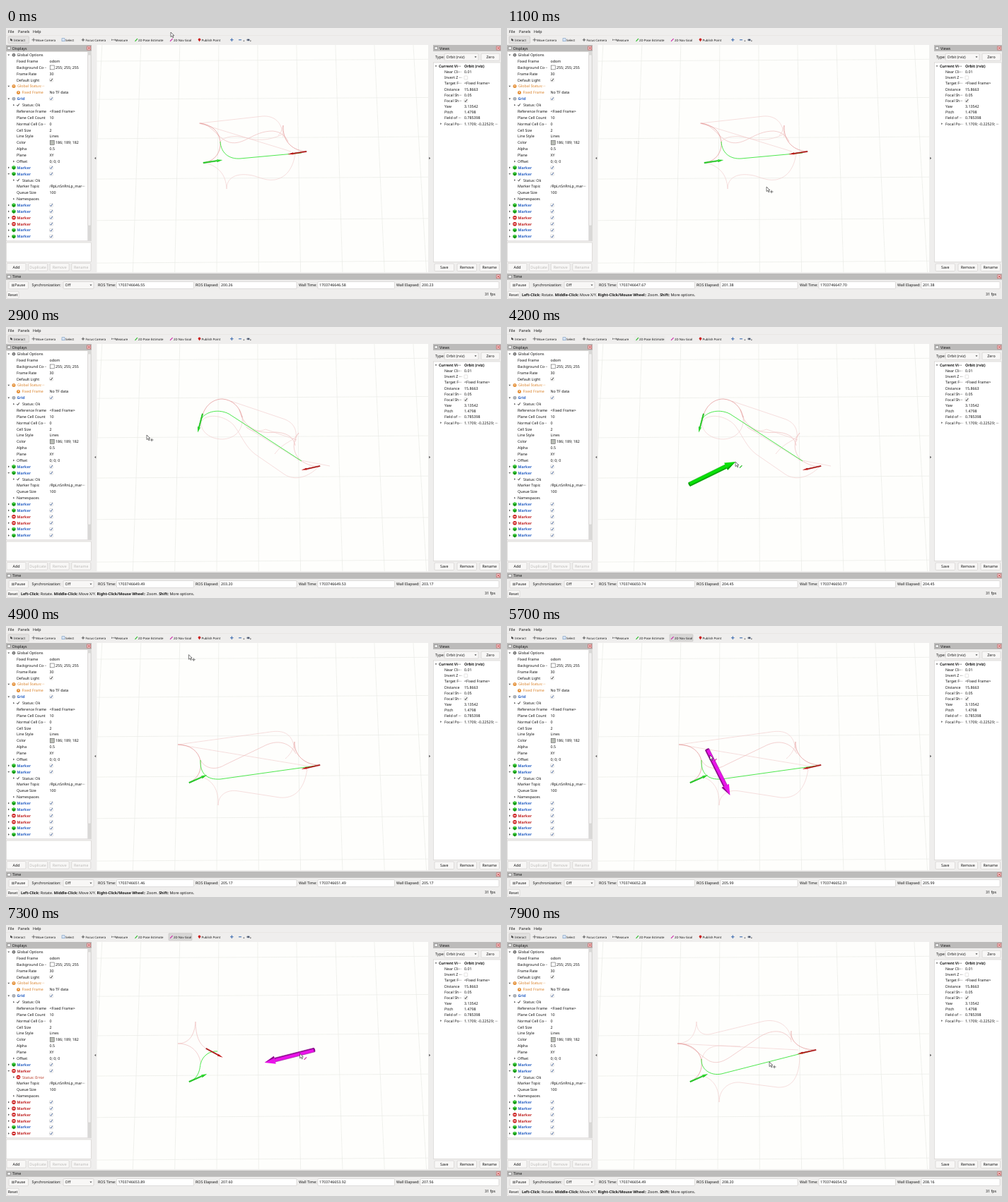
Write an HTML page that moves like this. It is 700 by 384 pixels and loops after 8000 ms.

```html
<!DOCTYPE html>
<html lang="en">
<head>
<meta charset="utf-8">
<title>Path planner in a 3D viewer</title>
<style>
html, body { margin: 0; width: 100%; height: 100%; overflow: hidden; background: #efeeed; }
svg { display: block; width: 700px; height: 384px; }
text { font: 5.3px "Noto Sans", "Open Sans", sans-serif; fill: #111; white-space: pre; text-rendering: geometricPrecision; }
.b { font-weight: 700; }
.tool { font-size: 4.35px; }
.blue { fill: #2a62c4; font-weight: 700; }
.bad { fill: #c02222; font-weight: 700; }
.warn { fill: #d9822b; }
.err { fill: #b5301c; }
.off { fill: #bbb9b7; }
.mid { text-anchor: middle; }
</style>
</head>
<body>
<svg id="stage" viewBox="0 0 700 384"></svg>
<script>
const text = (x, y, s, cls = '', id = '') =>
  `<text x="${x}" y="${y + 1.9}" class="${cls}" id="${id}">${s.replace(/</g, '&lt;')}</text>`;
const rect = (x, y, w, h, fill, stroke = 'none', r = 0) =>
  `<rect x="${x}" y="${y}" width="${w}" height="${h}" rx="${r}" fill="${fill}" stroke="${stroke}" stroke-width=".5"/>`;
const line = (d, color, w = .6) => `<path d="${d}" fill="none" stroke="${color}" stroke-width="${w}"/>`;
const shape = (d, fill) => `<path d="${d}" fill="${fill}"/>`;
const dot = (x, y, r, fill) => `<circle cx="${x}" cy="${y}" r="${r}" fill="${fill}"/>`;
const group = (id, body, extra = '') => `<g id="${id}" ${extra}>${body}</g>`;
const tick = (x, y, color = '#222') => line(`M${x - 1.6} ${y}l1.2 1.5l2.1 -3.3`, color, .9);
const checkbox = (x, y, on = true, color) =>
  rect(x - 2.4, y - 2.4, 4.8, 4.8, '#fff', '#c9c7c5', .6) + (on ? tick(x, y, color) : '');
const button = (x, y, w, h, label, cls = '') =>
  rect(x, y, w, h, '#f8f7f6', '#c6c3c0', 1.2) + text(x + w / 2, y + h / 2, label, 'mid ' + cls);
const field = (x, y, w, h) => rect(x, y, w, h, '#fff', '#c2bfbc', 1);
const combo = (x, y, w, label) =>
  rect(x, y, w, 10, '#f8f7f6', '#c2bfbc', 1.2) + text(x + 2.5, y + 5, label) +
  shape(`M${x + w - 5.5} ${y + 4}h3l-1.5 2z`, '#555');
const expander = (x, y, open) =>
  shape(open ? `M${x - 1.4} ${y - .8}h2.8l-1.4 1.9z` : `M${x - .8} ${y - 1.4}v2.8l1.9 -1.4z`, '#555');
const stop = (x, y) => dot(x, y, 2.8, '#cc2020') + rect(x - 1.6, y - .55, 3.2, 1.1, '#fff');
const cube = (x, y) =>
  shape(`M${x} ${y - 2.8}l2.6 1.3v2.8l-2.6 1.5l-2.6 -1.5v-2.8z`, '#16a316') +
  shape(`M${x} ${y - 2.8}l2.6 1.3l-2.6 1.3l-2.6 -1.3z`, '#4fd34f') + line(`M${x} ${y - .2}v2.9`, '#0a6b0a', .5);
const header = (x, y, w, label) =>
  rect(x, y, w, 9, '#bcbbba') + rect(x + 2, y + 2.6, 4.2, 3.8, '#f0f0f0', '#666') +
  text(x + 9, y + 4.7, label) + rect(x + w - 6.2, y + 2, 5, 5, '#f3dcdc', '#c23a3a') +
  line(`M${x + w - 5} ${y + 3.2}l2.6 2.6m0 -2.6l-2.6 2.6`, '#c02020', .9);

function arrow([x1, y1], [x2, y2], len, w, headLen, headW, fill, dark) {
  const angle = Math.atan2(y2 - y1, x2 - x1) * 180 / Math.PI, s = len - headLen;
  return `<g transform="translate(${x1} ${y1}) rotate(${angle})">` +
    rect(0, -w / 2, s, w, fill, dark) + rect(0, w * .25, s, w * .25, dark) +
    shape(`M${s} ${-headW / 2}L${len} 0L${s} ${headW / 2}z`, fill) +
    shape(`M${s} ${headW / 2}L${len} 0L${s} ${headW * .25}z`, dark) +
    (w > 3 ? `<ellipse cx="0" cy="0" rx="1.2" ry="${w / 2}" fill="${dark}"/>` : '') + '</g>';
}

// Ground plane as seen by the orbit camera.
function project(x, y) {
  const u = x - .96, v = -(y + .225);
  const up = u + .006 * v, right = v - .006 * u, k = 388.7 / (13.6 + up * .0907);
  return `${(363 + k * right).toFixed(1)} ${(185 - k * up).toFixed(1)}`;
}
function grid() {
  let d = '';
  for (let i = -10; i <= 10; i += 2)
    d += `M${project(i, -10)}L${project(i, 10)}M${project(-10, i)}L${project(10, i)}`;
  return line(d, '#e6e7e2', .6);
}

const PINK = '#f1cccc', ROSE = '#ecb6b6', RED = '#df8585', GREEN = '#45e645';
const pathsA = [
  [PINK, 'M273 135L363 125C379 124 391 133 392 155M392 138C389 147 388 150 385 152'],
  [PINK, 'M273 135L403 175M312 228C311 207 300 196 282 191'],
  [PINK, 'M312 228C312 213 324 206 342 208C356 209 364 217 380 215C397 212 406 198 409 178'],
  [ROSE, 'M275 135C292 137 299 157 316 162C337 167 349 146 377 146C389 147 395 153 399 161'],
  [PINK, 'M303 161C309 153 326 152 337 155C353 160 372 160 390 151'],
  [RED, 'M280 191C296 188 304 176 303 161C301 146 291 137 274 135'],
  [RED, 'M392 138C391 158 402 173 424 175'],
  [GREEN, 'M303 161C304 177 315 186 331 185L418 177']];
const scenes = [
  { at: 0, start: [[279, 191], [306, 187]], goal: [[425, 175], [399, 179]], paths: pathsA },
  { at: 1200, start: [[279, 191], [306, 187]], goal: [[443, 197], [417, 203]], paths: pathsA,
    warp: 'matrix(1.132 .153 0 1 -37 -42.8)' },
  { at: 2500, start: [[278, 123], [271, 150]], goal: [[444, 197], [417, 203]], paths: [
    [PINK, 'M277 128C271 145 286 159 306 159C325 158 336 145 334 126'],
    [PINK, 'M318 105L392 130C407 135 413 146 409 163M277 133C285 122 309 125 322 139'],
    [PINK, 'M322 139C334 155 338 169 352 180L394 209C408 218 427 214 443 197'],
    [PINK, 'M334 128C337 147 352 151 367 145L411 160M414 150C405 164 393 162 380 180'],
    [ROSE, 'M330 117C337 148 363 151 381 149C400 150 407 158 409 168'],
    [PINK, 'M412 188L458 197M340 142L414 188'],
    [RED, 'M277 128C281 111 293 102 306 102C320 103 331 113 334 128'],
    [ROSE, 'M414 150C403 163 406 181 418 190C426 195 434 198 443 197'],
    [GREEN, 'M276 130C284 119 301 116 315 123L418 190']] },
  { at: 4500, start: [[259, 222], [284, 211]], goal: [[444, 197], [417, 203]], paths: [
    [PINK, 'M243 168L374 150C393 147 407 153 408 178M408 164C407 176 400 184 395 188'],
    [PINK, 'M243 168L430 199M300 254C301 233 293 218 274 213'],
    [PINK, 'M300 254C300 239 313 231 329 234L387 243C408 245 422 232 426 202'],
    [ROSE, 'M275 190C281 202 296 205 309 197L363 171C385 159 402 166 410 181'],
    [RED, 'M259 222C272 216 277 204 275 191C272 177 260 168 243 168'],
    [RED, 'M408 164C407 183 423 197 443 197'],
    [GREEN, 'M275 190C274 210 285 218 303 217L438 198']] },
  { at: 6200, failed: true, start: [[259, 222], [284, 211]], goal: [[283, 175], [307, 188]], paths: [
    [ROSE, 'M243 168C260 168 267 154 268 137C268 156 273 169 283 175'],
    [ROSE, 'M243 168C260 168 272 178 275 194'],
    [GREEN, 'M260 222C273 216 274 204 275 197C278 185 288 178 299 179']] },
  { at: 7700, start: [[259, 222], [284, 211]], goal: [[437, 177], [410, 183]], paths: [
    [PINK, 'M241 168C260 167 267 154 268 137C268 151 277 158 290 154L360 137C382 131 402 143 402 166'],
    [PINK, 'M241 168L412 177M300 251C300 231 292 217 274 213'],
    [PINK, 'M300 251C300 234 312 222 329 223L383 230C403 231 414 216 414 183'],
    [PINK, 'M275 192C278 177 289 170 305 171L330 172'],
    [ROSE, 'M241 168C262 168 273 186 287 193C299 198 310 191 320 184L358 158C378 146 394 150 402 163'],
    [RED, 'M259 222C271 217 277 205 275 191C271 176 258 168 241 168'],
    [RED, 'M402 150C400 166 415 177 436 177'],
    [GREEN, 'M275 190C274 204 287 214 303 211L428 179']] }];

const drawScene = (s, i) => group('scene' + i,
  `<g ${s.warp ? `transform="${s.warp}"` : ''}>` +
  s.paths.map(([c, d]) => line(d, c, c === GREEN ? .95 : .65)).join('') + '</g>' +
  arrow(...s.start, 27.5, 1.4, 8, 4, '#2fdc2f', '#1cb51c') +
  arrow(...s.goal, 27, 1.2, 8, 3, '#c81616', '#960c0c'));

// Left panel
const ROW = 8.87, rowY = i => 38.2 + ROW * i;
const options = [
  [1, 'Fixed Frame', 'odom'], [2, 'Background Co···', '255; 255; 255', '#fff'], [3, 'Frame Rate', '30'],
  [4, 'Default Light'], [9, 'Reference Frame', '<Fixed Frame>'], [10, 'Plane Cell Count', '10'],
  [11, 'Normal Cell Co···', '0'], [12, 'Cell Size', '2'], [13, 'Line Style', 'Lines'],
  [14, 'Color', '186; 189; 182', '#babdb6'], [15, 'Alpha', '0.5'], [16, 'Plane', 'XY'],
  [17, 'Offset', '0; 0; 0'], [21, 'Marker Topic', '/RpLnSnRnLp_mar···'], [22, 'Queue Size', '100'], [23, 'Namespaces', '']];

const markerRow = (i, ok) => {
  const y = rowY(i);
  return (ok ? cube : stop)(11, y) + text(15.5, y, 'Marker', ok ? 'blue' : 'bad');
};
const markers = (flags, failed) => [18, 19, 24, 25, 26, 27, 28, 29].map((r, i) => markerRow(r, flags[i] === '1')).join('') +
  (failed ? stop(17.5, rowY(20)) : tick(17, rowY(20))) +
  text(23, rowY(20), failed ? 'Status: Error' : 'Status: Ok', failed ? 'err' : '');
const warning = (x, i, label) =>
  dot(x, rowY(i), 2.5, '#e5913a') + rect(x - .4, rowY(i) - 1.5, .8, 2, '#fff') + text(x + 5, rowY(i), label, 'warn');

function displays() {
  let s = header(0, 24, 121, 'Displays') + rect(.3, 33.8, 120, 268, '#fff', '#c6c3c0');
  for (const [i, name, value, swatch] of options) {
    const y = rowY(i);
    s += text(15, y, name);
    if (value === undefined) s += checkbox(64, y);
    else s += text(swatch ? 70 : 61.5, y, value);
    if (swatch) s += rect(62.2, y - 2.9, 6, 5.8, swatch, '#444');
  }
  s += dot(11, rowY(0), 2.3, '#666') + dot(11, rowY(0), .8, '#fff') + text(15.5, rowY(0), 'Global Options');
  s += warning(11, 5, 'Global Status:···') + warning(17.5, 6, 'Fixed Frame') + text(61.5, rowY(6), 'No TF data');
  s += dot(11, rowY(7), 2.4, '#8b939d') + line(`M8.8 ${rowY(7)}h4.4m-2.2 -2.2v4.4`, '#fff', .4) + text(15.5, rowY(7), 'Grid', 'blue');
  s += tick(17, rowY(8)) + text(23, rowY(8), 'Status: Ok');
  for (const i of [0, 5, 7, 19]) s += expander(3.8, rowY(i), true);
  for (const i of [18, 24, 25, 26, 27, 28, 29]) s += expander(3.8, rowY(i), false);
  for (const i of [8, 17, 20, 23]) s += expander(11, rowY(i), false);
  for (const i of [7, 18, 19, 24, 25, 26, 27, 28, 29]) s += checkbox(64, rowY(i), true, '#35558f');
  s += group('normal', markers('11110011')) + group('failed', markers('10000010', true));
  s += rect(115.3, 34, 5, 267.6, '#d9d8d7') + rect(115.6, 38, 4.4, 242, '#f1f0ef', '#cfcdcb', 1);
  s += rect(.3, 304, 120, 27.5, '#fff', '#c6c3c0');
  ['Add', 'Duplicate', 'Remove', 'Rename'].forEach((n, i) => s += button(1 + 30.6 * i, 333.5, 27, 10.5, n, i ? 'off' : ''));
  return s;
}

function views() {
  const rows = [['Near Cli···', '0.01'], ['Invert Z ···', false], ['Target F···', '<Fixed Frame>'], ['Distance', '15.8663'],
    ['Focal Sh···', '0.05'], ['Focal Sh···', true], ['Yaw', '3.13542'], ['Pitch', '1.4798'],
    ['Field of ···', '0.785398'], ['Focal Po···', '1.1709; -0.22529; ···']];
  let s = header(604, 24, 96, 'Views') + text(607, 41.2, 'Type:') + combo(620, 36.2, 48, 'Orbit (rviz)') + button(672, 36.2, 26, 10, 'Zero');
  s += rect(604.3, 49, 95.4, 282.5, '#fff', '#c6c3c0');
  s += expander(608, 54, true) + text(612, 54, 'Current Vi···', 'b') + text(648, 54, 'Orbit (rviz)', 'b');
  rows.forEach(([name, value], i) => {
    const y = 62.2 + 8.17 * i;
    s += text(620, y, name) + (typeof value === 'string' ? text(648, y, value) : checkbox(650.3, y, value));
  });
  s += expander(615, 135.7, false);
  ['Save', 'Remove', 'Rename'].forEach((n, i) => s += button(606 + 32 * i, 334, 27.5, 10.5, n));
  return s;
}

const tools = { interact: [3, 29.5, '#e2e1e0'], pose: [180, 44, '#ecebea'], nav: [230, 33, '#d9d8d7'] };
function toolbar() {
  let s = text(3, 5.2, 'File') + text(17, 5.2, 'Panels') + text(38, 5.2, 'Help') + rect(0, 10.6, 700, .4, '#dddbd9');
  for (const k in tools) {
    const [x, w, fill] = tools[k];
    s += group('tool-' + k, rect(x, 11.8, w, 10, fill, k === 'pose' ? 'none' : '#bdbbb9', 1));
  }
  const labels = [[11, 'Interact'], [42, 'Move Camera'], [84, 'Select'], [112.5, 'Focus Camera'], [154.5, 'Measure'],
    [187, '2D Pose Estimate'], [237, '2D Nav Goal'], [276.5, 'Publish Point']];
  for (const [x, n] of labels) s += text(x, 16.8, n, 'tool');
  const y = 16.8;
  s += shape(`M6 ${y - 2}l3 1.5v2.5l-3 -1z`, '#555') + line(`M36.5 ${y}h5m-2.5 -2.5v5`, '#555', .8);
  s += rect(79, y - 2, 4, 4, '#dce8f6', '#5580b5') + dot(109, y, 1.6, '#777') + line(`M106.5 ${y}h5m-2.5 -2.5v5`, '#777', .5);
  s += line(`M149.5 ${y}h4.5m-4.5 -1.2v2.4m4.5 -2.4v2.4`, '#666', .7);
  s += line(`M182.5 ${y + 2}l3.4 -3.6`, '#22bb22', 1.1) + line(`M232 ${y + 2}l3.6 -3.6`, '#cc22aa', 1.1);
  s += dot(273.5, y - .6, 1.8, '#cc2222') + shape(`M271.9 ${y}h3.2l-1.6 2.8z`, '#cc2222');
  s += line(`M317 ${y}h4.6m-2.3 -2.3v4.6`, '#3d6cb0', 1.1) + line(`M329 ${y}h4`, '#3d6cb0', 1.1) + shape(`M335.2 ${y + 1}h2.4l-1.2 1.5z`, '#555');
  s += `<ellipse cx="342.6" cy="${y}" rx="2.6" ry="1.6" fill="#8a97aa"/>` + dot(342.6, y, .9, '#223') + shape(`M344.6 ${y + 1}h2.4l-1.2 1.5z`, '#555');
  return s;
}

function timePanel() {
  const y = 364.5;
  let s = header(0, 347.8, 700, 'Time') + button(4, 359.3, 27.5, 10.4, '   Pause') + rect(8.4, y - 1.8, 1, 3.6, '#444') + rect(10.3, y - 1.8, 1, 3.6, '#444');
  s += text(36.5, y, 'Synchronization:') + combo(81, 359.5, 43, 'Off');
  const cells = [['ROS Time:', 130, 156.5, 109], ['ROS Elapsed:', 268, 302, 109], ['Wall Time:', 414, 441, 108.5], ['Wall Elapsed:', 552, 586, 111]];
  cells.forEach(([label, x, fx, w], i) => s += text(x, y, label) + field(fx, 359.5, w, 10) + text(fx + 2, y, '', '', 'clock' + i));
  s += button(1, 373.2, 17, 10, 'Reset') + text(677, 377.5, '31 fps');
  const bold = t => `<tspan class="b">${t}</tspan>`;
  s += `<text id="help" x="21" y="379.9">${bold('Left-Click:')} Rotate. ${bold('Middle-Click:')} Move X/Y. ${bold('Right-Click/Mouse Wheel:')}: Zoom. ${bold('Shift:')} More options.</text>`;
  return s;
}

const pointer = group('cursor',
  `<path d="M0 0v6.6l1.6 -1.4l1.2 2.5l1.1 -.5l-1.2 -2.5h2.1z" fill="#fff" stroke="#222" stroke-width=".6"/>` +
  group('hint-interact', line('M4.6 7h5m-2.5 -2.3v4.6', '#666', .7) + dot(7.1, 7, 1.2, '#888')) +
  group('hint-pose', line('M6 8.6l3.4 -3.4', '#22bb22', 1.2)) +
  group('hint-nav', line('M6 8.6l3.4 -3.4', '#cc22aa', 1.2)));

const stage = document.getElementById('stage');
stage.innerHTML = rect(0, 0, 700, 384, '#efeeed') + toolbar() +
  '<clipPath id="view"><rect x="128.5" y="24" width="468.5" height="322"/></clipPath>' +
  group('world', rect(128, 24, 470, 322, '#fefefc') + grid() + scenes.map(drawScene).join('') + group('drag', ''), 'clip-path="url(#view)"') +
  shape('M127.2 182.8v3.4l-2 -1.7z', '#555') + shape('M598.2 182.8v3.4l2 -1.7z', '#555') +
  displays() + views() + timePanel() + pointer;

const $ = id => document.getElementById(id);
const show = (id, on) => $(id).style.display = on ? '' : 'none';

// Linear interpolation through [time, ...values] knots.
function track(knots, t) {
  let i = 1;
  while (i < knots.length - 1 && knots[i][0] < t) i++;
  const a = knots[i - 1], b = knots[i], k = Math.min(1, Math.max(0, (t - a[0]) / (b[0] - a[0])));
  return a.slice(1).map((v, j) => v + (b[j + 1] - v) * k);
}

const cursorTrack = [
  [0, 233, 6], [200, 245, 16], [500, 443, 197], [900, 376, 213], [1100, 367, 225], [1600, 204, 16], [2000, 278, 123],
  [2500, 260, 188], [2900, 199, 153], [3300, 204, 8], [3500, 204, 16], [3900, 258, 223], [4200, 323, 191], [4400, 326, 190],
  [4700, 285, 90], [5000, 245, 16], [5500, 283, 175], [5600, 283, 175], [5700, 287, 183], [6100, 325, 199],
  [6500, 272, 54], [6700, 245, 16], [7100, 436, 177], [7600, 385, 190], [7900, 371, 194]];
// ROS seconds, ROS elapsed, wall seconds, wall elapsed
const clockTrack = [
  [0, 46.55, 200.26, 46.58, 200.23], [1100, 47.67, 201.38, 47.70, 201.38], [2900, 49.49, 203.20, 49.53, 203.17],
  [4200, 50.74, 204.45, 50.77, 204.45], [5700, 52.28, 205.99, 52.31, 205.99], [6500, 53.08, 206.79, 53.11, 206.76],
  [7900, 54.49, 208.20, 54.52, 208.16]];
// Tool picked, button pressed, button released
const drags = [
  { tool: 'nav', pick: 200, press: 500, release: 900, from: [443, 197] },
  { tool: 'pose', pick: 1600, press: 2000, release: 2500, from: [278, 123] },
  { tool: 'pose', pick: 3500, press: 3900, release: 4400, from: [258, 223] },
  { tool: 'nav', pick: 5000, press: 5600, release: 6100, from: [283, 175] },
  { tool: 'nav', pick: 6700, press: 7100, release: 7600, from: [436, 177] }];
const dragColors = { pose: ['#08e008', '#0aa00a'], nav: ['#ea12ea', '#8a108a'] };

function render(t) {
  const [cx, cy] = track(cursorTrack, t);
  const use = drags.find(d => t >= d.pick && t < d.release);
  const tool = use ? use.tool : 'interact';
  const inView = cx > 128 && cx < 597 && cy > 24 && cy < 346;
  for (const k in tools) {
    show('tool-' + k, k === tool);
    show('hint-' + k, inView && k === tool);
  }
  show('help', inView && tool === 'interact');
  $('cursor').setAttribute('transform', `translate(${cx} ${cy})`);
  const dragging = use && t > use.press;
  $('drag').innerHTML = dragging ? arrow(use.from, [cx, cy], 72.5, 5.8, 15, 11.5, ...dragColors[tool]) : '';

  const current = scenes.filter(s => t >= s.at).pop();
  scenes.forEach((s, i) => show('scene' + i, s === current));
  show('failed', !!current.failed);
  show('normal', !current.failed);
  track(clockTrack, t).forEach((v, i) => $('clock' + i).textContent = (i % 2 ? '' : '17037466') + v.toFixed(2));
}

let last = -1;
const begin = performance.now();
function tickFrame() {
  const step = Math.floor((performance.now() - begin) % 8000 / 100);
  if (step !== last) render((last = step) * 100);
  requestAnimationFrame(tickFrame);
}
render(0);
tickFrame();
</script>
</body>
</html>
```
